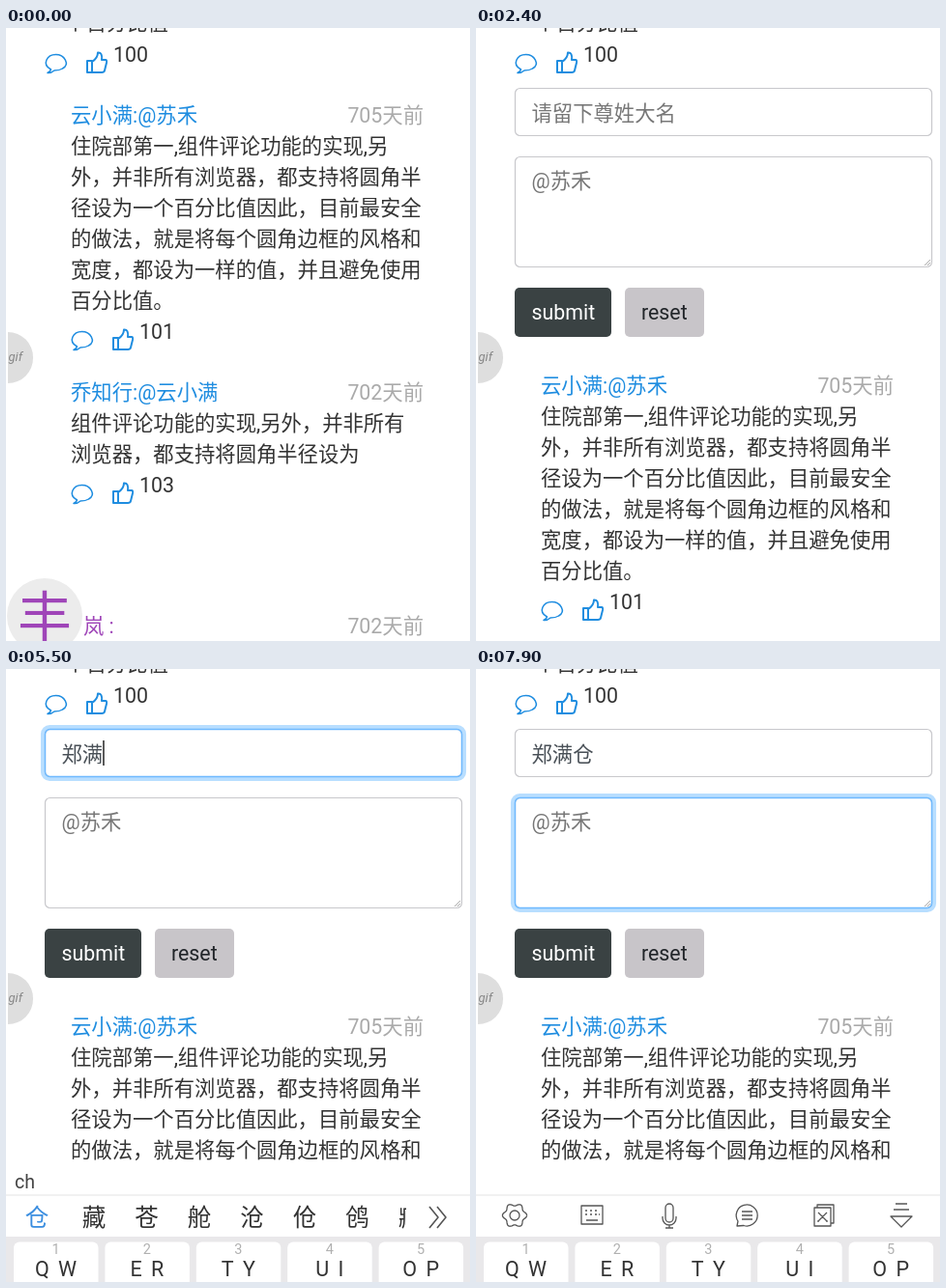
Recreate the animation shown at these times as an HTML page with a canvas. Size 480 by 635 pixels, loop 8000 ms.

```html
<!DOCTYPE html>
<html lang="zh-CN">
<head>
<meta charset="utf-8">
<style>
  html, body { margin: 0; width: 100%; height: 100%; overflow: hidden; background: #fff; }
  canvas { display: block; }
</style>
</head>
<body>
<canvas id="stage" width="480" height="635"></canvas>
<script>
const ctx = document.getElementById('stage').getContext('2d');
const LOOP = 8000, EM = 64 / 3;
const BLUE = '#1f8de0', INK = '#333', HINT = '#777', PURPLE = '#9f45b8', TOOL = '#555';
const FORM_AT = 1700, NAME_FOCUS = 3250, TEXT_FOCUS = 6100;

const comments = [
  { y: 98, title: '云小满:@苏禾', date: '705天前', likes: 101, lines: [
    '住院部第一,组件评论功能的实现,另',
    '外，并非所有浏览器，都支持将圆角半',
    '径设为一个百分比值因此，目前最安全',
    '的做法，就是将每个圆角边框的风格和',
    '宽度，都设为一样的值，并且避免使用',
    '百分比值。'] },
  { y: 385, title: '乔知行:@云小满', date: '702天前', likes: 103, lines: [
    '组件评论功能的实现,另外，并非所有',
    '浏览器，都支持将圆角半径设为'] },
];

// Each entry: typed letters, first key, second key, commit time, result, candidates
const typing = [
  ['vh', 4200, 4400, 4800, '郑', '张层正蒸整郑证征'],
  ['mj', 5000, 5100, 5300, '满', '满慢曼漫蛮瞒馒蔓'],
  ['ch', 5400, 5500, 5800, '仓', '仓藏苍舱沧伧鸧臧'],
];

const bubble = new Path2D('M-5 6.5C-15 1-9-9 0-9S15 1 7 5.5C4 7.5 0 7.5-1.5 7.5Q-5 10.5-8.5 10Q-5.5 8.5-5 6.5Z');
const thumb = new Path2D('M-10-2H-5V10H-10ZM-5-1C-2-3 1-6 1-10.5Q6-11 5-3H9Q10.5-3 10 0L8 8Q7.5 10 5 10H-5');

const gear = new Path2D();
for (let i = 0; i <= 72; i++) {
  const a = i * Math.PI / 36, r = 11.2 + 1.4 * Math.cos(6 * a);
  gear.lineTo(r * Math.cos(a), r * Math.sin(a));
}
gear.moveTo(5, 0);
gear.arc(0, 0, 5, 0, 7);

const tools = [
  gear,
  new Path2D('M-11-10H11V9H-11ZM-7-5H-5M-2-5H0M3-5H5M-7-1H-5M-2-1H0M3-1H5M7-1H8M-6 5H6'),
  new Path2D('M-4-8A4 4 0 0 1 4-8V3A4 4 0 0 1-4 3ZM-7 1V3A7 7 0 0 0 7 3V1M0 10V13M-4 13H4'),
  new Path2D('M-10 11L-9 6A11 11 0 1 1-3 10.5ZM-5-4H6M-5 0H6M-5 4H6'),
  new Path2D('M-10-8H7V11H-10ZM-7-8V-11H10V8H7M-6-3L3 6M3-3L-6 6M-6 5V7M3 5V7'),
  new Path2D('M-6-12H6M-8-6H8M-11 1H11L0 12Z'),
];

const clamp = v => Math.max(0, Math.min(1, v));

function text(str, x, y, color = INK, size = EM, align = 'left', style = '') {
  ctx.font = `${style} ${size}px Roboto, "Noto Sans CJK SC", "Noto Sans CJK", sans-serif`;
  ctx.textAlign = align;
  ctx.fillStyle = color;
  ctx.fillText(str, x, y);
}

function icon(path, x, y, color, width) {
  ctx.save();
  ctx.translate(x, y);
  ctx.strokeStyle = color;
  ctx.lineWidth = width;
  ctx.lineJoin = 'round';
  ctx.stroke(path);
  ctx.restore();
}

function box(x, y, w, h, r, fill) {
  ctx.beginPath();
  ctx.roundRect(x, y, w, h, r);
  ctx.fillStyle = fill;
  ctx.fill();
}

function outline(x, y, w, h, r, color, width) {
  ctx.beginPath();
  ctx.roundRect(x, y, w, h, r);
  ctx.strokeStyle = color;
  ctx.lineWidth = width;
  ctx.stroke();
}

function likeBar(x, y, count) {
  icon(bubble, x + 11.5, y + 1.5, BLUE, 1.5);
  icon(thumb, x + 54, y + 1, BLUE, 2);
  text(count, x + 71, y);
}

function drawComment({ y, title, date, likes, lines }) {
  text(title, 67, y, BLUE);
  text(date, 432, y, '#aaa', EM, 'right');
  lines.forEach((line, i) => text(line, 67, y + 32 * (i + 1)));
  likeBar(67, y + 32 * (lines.length + 1), likes);
}

function field(y, h, glow) {
  outline(40.5, y, 431, h, 5, '#c8c8cc', 1.2);
  if (!glow) return;
  outline(38.2, y - 2.3, 435.6, h + 4.6, 7, `rgba(60,165,255,${0.36 * glow})`, 4.5);
  outline(40.5, y, 431, h, 5, `rgba(110,185,255,${clamp(glow * 2)})`, 1.4);
}

function caret(x, y, since) {
  if (since % 1000 >= 500) return;
  ctx.fillStyle = '#333';
  ctx.fillRect(x, y, 1.6, 26);
}

function touch(x, y, alpha) {
  if (alpha <= 0) return;
  ctx.beginPath();
  ctx.arc(x, y, 15, 0, 7);
  ctx.strokeStyle = `rgba(130,130,140,${alpha})`;
  ctx.lineWidth = 1;
  ctx.stroke();
}

function drawForm(t) {
  const onText = t >= TEXT_FOCUS, onName = t >= NAME_FOCUS && !onText;
  const textGlow = clamp((t - TEXT_FOCUS) / 150);
  const nameGlow = clamp((t - NAME_FOCUS) / 150) * (1 - textGlow);
  const name = typing.filter(e => t >= e[3]).map(e => e[4]).join('');

  field(62.5, 49, nameGlow);
  text(name || '请留下尊姓大名', 57.5, 95.5, name ? '#495057' : HINT);
  if (onName) caret(57.5 + name.length * EM, 74, t - NAME_FOCUS);

  field(133.5, 114, textGlow);
  text('@苏禾', 57.5, 166, HINT);
  if (onText) caret(57.5, 145.5, t - TEXT_FOCUS);
  icon(new Path2D('M0 6L6 0M3 6L6 3'), 464, 240, '#999', 0.8);

  box(40, 269, 100, 51, 5, '#3a4243');
  text('submit', 57.5, 302, '#fff');
  box(154, 269, 82, 51, 5, '#c8c5c9');
  text('reset', 171, 302, '#212529');

  if (onName) touch(214, 83, 0.35 * (1 - (t - NAME_FOCUS) / 200));
  if (onText) touch(282, 155, 0.35 * (1 - (t - TEXT_FOCUS) / 250));
}

function drawCandidates(chars) {
  ctx.save();
  ctx.beginPath();
  ctx.rect(0, 546, 414, 42);
  ctx.clip();
  [...chars].forEach((c, i) =>
    text(c, i ? 36.5 + 54.5 * i : 32, 577, i ? INK : '#3d8fe0', 24.5, 'center'));
  ctx.restore();
  icon(new Path2D('M0-11L9 0L0 11M8-11L17 0L8 11'), 438, 568, TOOL, 1.6);
}

function drawKeyboard(t) {
  const rise = clamp((t - 3300) / 200);
  ctx.fillStyle = '#fff';
  ctx.fillRect(0, 514, 480, 121);
  ctx.save();
  ctx.translate(0, 51 * (1 - rise) ** 2);
  ctx.globalAlpha = 0.65 + 0.35 * rise;

  if (rise > 0) {
    ctx.fillStyle = '#e4e4e4';
    ctx.fillRect(0, 544.5, 480, 1);
  }
  const entry = typing.find(e => t >= e[1] && t < e[3]);
  if (entry) {
    const [letters, , second, , , chars] = entry;
    text(t < second ? letters[0] : letters, 9, 538, '#444', 19.5);
    drawCandidates(chars);
  } else {
    tools.forEach((tool, i) => icon(tool, 40 + 80 * i, 566, TOOL, 1.3));
  }

  ctx.fillStyle = '#e9e8ea';
  ctx.fillRect(0, 588, 480, 50);
  ctx.wordSpacing = '4px';
  ['Q W', 'E R', 'T Y', 'U I', 'O P'].forEach((label, i) => {
    const x = 8 + 94.4 * i;
    box(x, 593.5, 87.5, 60, 6, '#fff');
    text(i + 1, x + 43.5, 605.5, '#b0b0b0', 14.5, 'center');
    text(label, x + 43.5, 629, INK, 21.5, 'center');
  });
  ctx.restore();
}

function drawBadge() {
  ctx.save();
  ctx.beginPath();
  ctx.rect(2, 310, 40, 64);
  ctx.clip();
  box(-24, 315, 52, 53, 26.5, '#dedede');
  text('gif', 2.5, 345, '#888', 13, 'left', 'italic');
  ctx.restore();
}

function draw(t) {
  ctx.fillStyle = '#fff';
  ctx.fillRect(0, 0, 480, 635);
  text('个百分比值', 61.3, 2);
  likeBar(40, 35, 100);

  const open = t >= FORM_AT;
  ctx.save();
  if (open) ctx.translate(0, 280);
  comments.forEach(drawComment);
  box(1, 570, 78, 78, 39, '#ececec');
  text('丰', 40, 630, PURPLE, 56, 'center');
  text('岚 :', 80, 627, PURPLE);
  text('702天前', 432, 627, '#aaa', EM, 'right');
  ctx.restore();

  if (open) drawForm(t);
  if (t >= NAME_FOCUS) drawKeyboard(t);
  drawBadge();
}

const start = performance.now();
function tick() {
  draw((performance.now() - start) % LOOP);
  requestAnimationFrame(tick);
}
tick();
</script>
</body>
</html>
```
